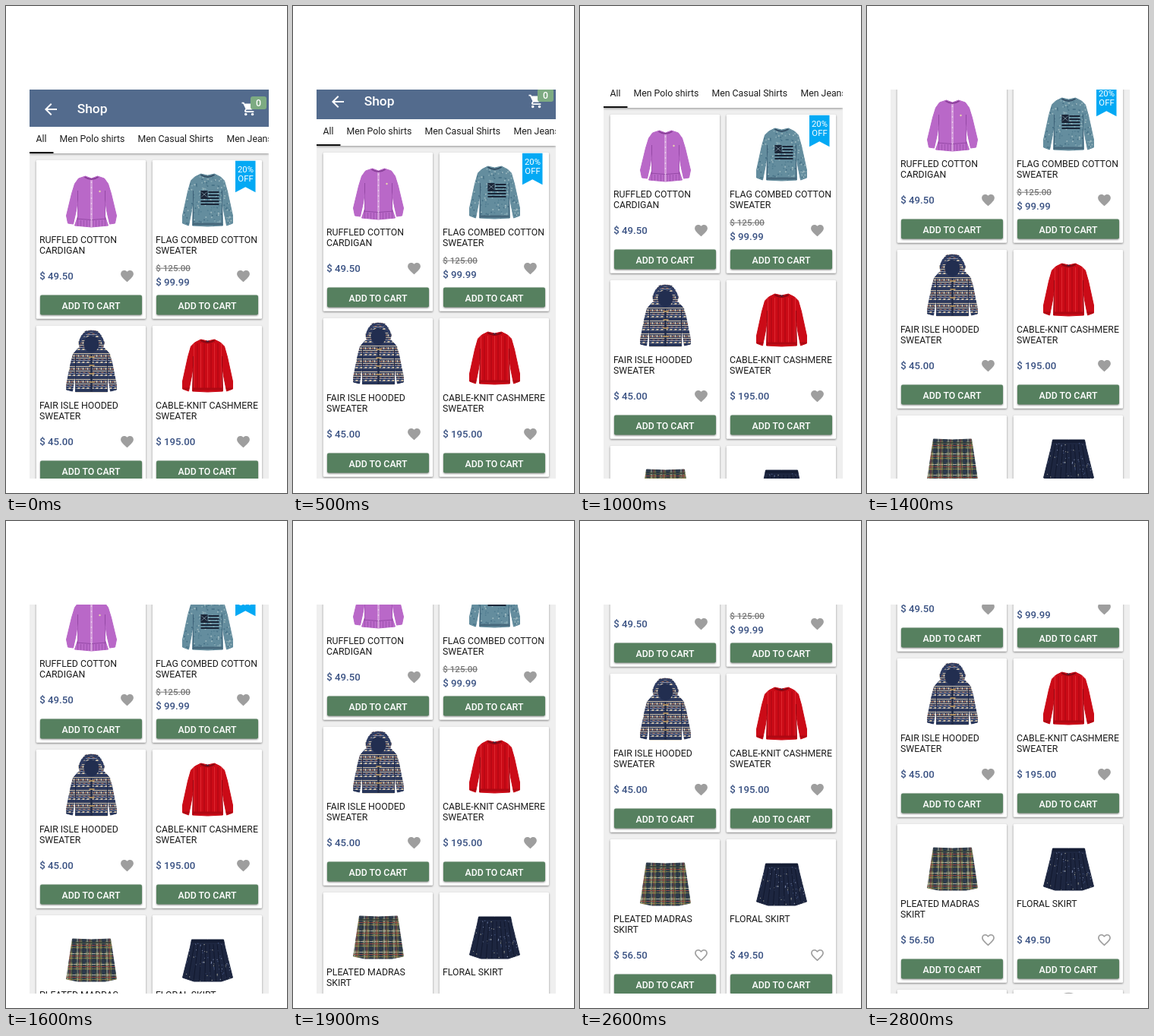
An HTML page for the animation above (2.9 s loop, 370 by 641 pixels).

```html
<!DOCTYPE html>
<html lang="en">
<head>
<meta charset="utf-8">
<title>Shop</title>
<style>
  html, body { margin: 0; width: 100%; height: 100%; overflow: hidden; background: #fff; }
  svg { display: block; font: 12.3px Roboto, sans-serif; }
  .card { fill: #fff; filter: drop-shadow(0 1px 1.3px #0007); }
  .button { fill: #56805f; filter: drop-shadow(0 1px 1px #0007); }
  .bar { filter: drop-shadow(0 1px 1.5px #0006); }
  .name { fill: #1c1c1c; }
  .price { fill: #3a5283; font-size: 13.2px; font-weight: 500; }
  .old { fill: #777; font-size: 11.6px; font-weight: 500; }
  .label { fill: #fff; font-weight: 500; text-anchor: middle; }
  .off { fill: #fff; font-size: 11.3px; text-anchor: middle; }
</style>
</head>
<body>
<svg width="370" height="641" viewBox="0 0 370 641">
  <defs>
    <clipPath id="screen"><path d="M31 110h315v512H31z"/></clipPath>
    <pattern id="knit" width="6" height="17" patternUnits="userSpaceOnUse">
      <path fill="#2d395c" d="M0 0h6v17H0z"/>
      <path fill="#cdbfa8" d="M0 2h6v1H0zM0 8h6v1H0zM0 4h2v3H0zM4 4h1v2H4zM0 13h3v2H0z"/>
      <path fill="#a06a55" d="M3 5h2v2H3zM1 10h3v1H1z"/>
      <path fill="#7f8ba6" d="M0 11h6v1H0zM4 14h2v1H4z"/>
    </pattern>
    <pattern id="plaid" width="13" height="14" patternUnits="userSpaceOnUse">
      <path fill="#53604f" d="M0 0h13v14H0z"/>
      <path fill="#202d48" fill-opacity=".75" d="M1 0h4v14H1zM0 2h13v4H0z"/>
      <path fill="#d9d4b8" fill-opacity=".75" d="M7 0h1v14H7zM0 8h13v1H0z"/>
      <path fill="#a4443f" fill-opacity=".8" d="M10 0h1v14h-1zM0 11h13v1H0z"/>
      <path fill="#b9a64c" fill-opacity=".5" d="M12 0h1v14h-1zM0 0h13v1H0z"/>
    </pattern>
  </defs>
  <g clip-path="url(#screen)">
    <path fill="#efefef" d="M31 110h315v512H31z"/>
    <g id="page"></g>
  </g>
</svg>
<script>
const HEART = 'M12 21.35l-1.45-1.32C5.4 15.36 2 12.28 2 8.5 2 5.42 4.42 3 7.5 3c1.74 0 3.41.81 4.5 2.09C13.09 3.81 14.76 3 16.5 3 19.58 3 22 5.42 22 8.5c0 3.78-3.4 6.86-8.55 11.54L12 21.35z';
const HEART_LINE = 'M16.5 3c-1.74 0-3.41.81-4.5 2.09C10.91 3.81 9.24 3 7.5 3 4.42 3 2 5.42 2 8.5c0 3.78 3.4 6.86 8.55 11.54L12 21.35l1.45-1.32C18.6 15.36 22 12.28 22 8.5 22 5.42 19.58 3 16.5 3zm-4.4 15.55l-.1.1-.1-.1C7.14 14.24 4 11.39 4 8.5 4 6.5 5.5 5 7.5 5c1.54 0 3.04.99 3.57 2.36h1.87C13.46 5.99 14.96 5 16.5 5c2 0 3.5 1.5 3.5 3.5 0 2.89-3.14 5.74-7.9 10.05z';
const CART = 'M7 18c-1.1 0-1.99.9-1.99 2S5.9 22 7 22s2-.9 2-2-.9-2-2-2zM1 2v2h2l3.6 7.59-1.35 2.45c-.16.28-.25.61-.25.96 0 1.1.9 2 2 2h12v-2H7.42c-.14 0-.25-.11-.25-.25l.03-.12.9-1.63h7.45c.75 0 1.41-.41 1.75-1.03l3.58-6.49c.08-.14.12-.31.12-.48 0-.55-.45-1-1-1H5.21l-.94-2H1zm16 16c-1.1 0-1.99.9-1.99 2s.89 2 1.99 2 2-.9 2-2-.9-2-2-2z';
const BACK = 'M20 11H7.83l5.59-5.59L12 4l-8 8 8 8 1.41-1.41L7.83 13H20v-2z';

const text = (x, y, cls, str) => `<text x="${x}" y="${y}" class="${cls}">${str}</text>`;
const icon = (d, x, y, scale, fill) =>
  `<path d="${d}" fill="${fill}" transform="translate(${x} ${y}) scale(${scale})"/>`;
const line = (d, color, width = 1) =>
  `<path d="${d}" fill="none" stroke="${color}" stroke-width="${width}"/>`;
const repeat = (n, fn) => Array.from({ length: n }, (_, i) => fn(i)).join('');

let seed = 7;
const random = () => (seed = seed * 16807 % 2147483647) / 2147483647;
const specks = (n, colors, r) => repeat(n, i =>
  `<circle cx="${(random() * 70 - 35).toFixed(1)}" cy="${(16 + random() * 73).toFixed(1)}" r="${r}" fill="${colors[i % colors.length]}"/>`);

// A garment is its right half mirrored, with details clipped to the outline.
let clips = 0;
function garment(half, fill, details = '') {
  const pts = [...half, ...half.map(([x, y]) => [-x, y]).reverse()].join(' ');
  const id = 'cut' + clips++;
  return `<clipPath id="${id}"><polygon points="${pts}"/></clipPath>
    <polygon points="${pts}" fill="${fill}" stroke="${fill}" stroke-linejoin="round"/>
    <g clip-path="url(#${id})">${details}</g>`;
}

const SWEATER = [[0, 20], [9, 18], [17, 22], [22, 27], [26, 41], [33, 73], [33, 83], [25, 86], [21, 66], [19, 52], [20, 86], [0, 87]];
const CARDIGAN = [[0, 24], [8, 21], [17, 24], [22, 31], [26, 44], [33, 73], [31, 83], [24, 84], [20, 66], [18, 52], [18, 74], [22, 86], [0, 88]];
const HOODIE = [[0, 28], [10, 26], [18, 30], [24, 37], [27, 48], [33, 78], [33, 84], [25, 86], [21, 62], [21, 87], [0, 87]];
const HOOD = [[0, 6], [8, 7], [13, 13], [17, 22], [15, 29], [8, 34], [0, 37]];
const PLEATED = [[0, 32], [25, 31], [27, 44], [33, 84], [18, 87], [0, 87]];
const FLARED = [[0, 32], [21, 32], [23, 42], [33, 82], [18, 87], [0, 87]];
const sides = (color, x = 19) => line(`M${-x} 40V86M${x} 40V86`, color);

const cardigan = garment(CARDIGAN, '#b968c8',
  sides('#9549a6', 18) + line('M0 24V88', '#d39adb', 3) +
  line('M-9 22Q0 28 9 22', '#8a4199', 2) + line('M-20 77Q0 80 20 77', '#9549a6') +
  repeat(10, i => line(`M${i * 4 - 18} 79v9`, '#a054b1')) +
  repeat(8, i => `<circle cy="${29 + i * 7}" r=".8" fill="#f2dff3"/>`) +
  '<circle cx="11" cy="41" r="1.2" fill="#e6d5ad"/>');

const flag = garment(SWEATER, '#648d9e',
  specks(260, ['#86a9b4', '#456f85', '#9bb7be', '#537f92'], 1) + sides('#3d6177') +
  line('M-9 19Q0 25 9 19', '#344f65', 2) + line('M-20 84H20', '#46687c', 3) +
  '<path fill="#1b2638" d="M-9 40h9v10h-9z"/>' +
  repeat(5, i => line(`M${i < 2 ? 1 : -9} ${42 + i * 4}H15`, '#1b2638', 2)) +
  line('M-8 42l7 6M-1 42l-7 6', '#8296a4', .8));

const hoodie = garment(HOODIE, 'url(#knit)',
  sides('#1c2745', 21) + line('M-34 85H34', '#28365a', 4) + line('M0 34V88', '#202b49', 2.5)) +
  garment(HOOD, 'url(#knit)', '<ellipse cy="24" rx="10" ry="11" fill="#222e50"/>' +
  line('M-16 24Q-11 7 0 7Q11 7 16 24', '#303d63', 3)) +
  repeat(4, i => line(`M-3 ${41 + i * 11}h7`, '#c9a262', 1.5));

const cable = garment(SWEATER, '#cb0b17',
  repeat(9, i => line(`M${i * 4.5 - 18} 23V84`, i % 2 ? '#a90713' : '#df2730')) +
  sides('#940510') + line('M-9 19Q0 25 9 19', '#8d0712', 2.5) +
  line('M-34 83H34', '#ae0813', 3) + '<path fill="#26304a" d="M-2 19h4v2h-4z"/>');

const madras = garment(PLEATED, 'url(#plaid)',
  repeat(9, i => line(`M${i * 5 - 20} 38L${(i * 5 - 20) * 1.35} 88`, '#25302e88')) +
  line('M-26 36H26', '#24302f', 1.5));

const floral = garment(FLARED, '#1d2640',
  specks(150, ['#7d8bad', '#465884', '#a5a698'], .65) +
  repeat(8, i => line(`M${i * 5 - 17.5} 38L${(i * 5 - 17.5) * 1.5} 88`, '#11182d')) +
  line('M-22 34H22', '#151d34', 4));

const products = [
  { name: ['RUFFLED COTTON', 'CARDIGAN'], price: '49.50', art: cardigan, liked: true },
  { name: ['FLAG COMBED COTTON', 'SWEATER'], price: '99.99', old: '125.00', art: flag, liked: true },
  { name: ['FAIR ISLE HOODED', 'SWEATER'], price: '45.00', art: hoodie, liked: true },
  { name: ['CABLE-KNIT CASHMERE', 'SWEATER'], price: '195.00', art: cable, liked: true },
  { name: ['PLEATED MADRAS', 'SKIRT'], price: '56.50', art: madras },
  { name: ['FLORAL SKIRT'], price: '49.50', art: floral },
  { name: [], price: '', art: '' },
  { name: [], price: '', art: line('M-7 6Q0 3 7 6', '#aaa', 1.5) },
];

const sale = `<path fill="#03a9f4" d="M109 .8h26.5v41.5l-13.2-7-13.3 7z"/>` +
  text(122.5, 15.5, 'off', '20%') + text(122.5, 28, 'off', 'OFF') +
  text(4.3, 146, 'old', '$ 125.00') + line('M4 142.2H50', '#777');

function card({ name, price, old, art, liked }, i) {
  return `<g transform="translate(${40 + i % 2 * 153} ${203 + (i >> 1) * 218})">
    <rect class="card" x="-.3" y="-.2" width="144.4" height="209" rx="1.5"/>
    <g transform="translate(72.5 0)">${art}</g>
    ${name.map((row, n) => text(4, 109.4 + n * 14, 'name', row)).join('')}
    ${old ? sale : ''}
    ${text(4.2, old ? 165.4 : 157.4, 'price', '$ ' + price)}
    ${icon(liked ? HEART : HEART_LINE, 109.4, 142.4, .84, '#9e9e9e')}
    <rect class="button" x="5" y="177.6" width="134" height="26" rx="2"/>
    ${text(72, 195.7, 'label', 'ADD TO CART')}
  </g>`;
}

const tabs = [[40, 'All'], [71, 'Men Polo shirts'], [174, 'Men Casual Shirts'], [291, 'Men Jeans']];
const page = document.getElementById('page');
page.innerHTML = products.map(card).join('') + `
  <path class="bar" fill="#fff" d="M31 159h315v35H31z"/>
  <path fill="#536b8d" d="M31 110h315v49H31z"/>
  ${icon(BACK, 47, 124, 1, '#fff')}
  <text x="93.7" y="140.5" fill="#fff" font-size="17.4" font-weight="500">Shop</text>
  ${icon(CART, 309.6, 125, .88, '#fff')}
  <rect x="322" y="119" width="21" height="17" rx="3" fill="#7dab82"/>
  ${text(332.5, 131.8, 'label', '0')}
  ${tabs.map(([x, label]) => text(x - .5, 179, 'name', label)).join('')}
  <path fill="#111" d="M31 192h31.5v2H31z"/>`;

const LOOP = 2900, STEP = 100, START = 400;
function draw() {
  const t = performance.now() % LOOP;
  const scroll = 10 * Math.max(0, Math.floor((t - START) / STEP));
  page.setAttribute('transform', `translate(0 ${-scroll})`);
  requestAnimationFrame(draw);
}
draw();
</script>
</body>
</html>
```
